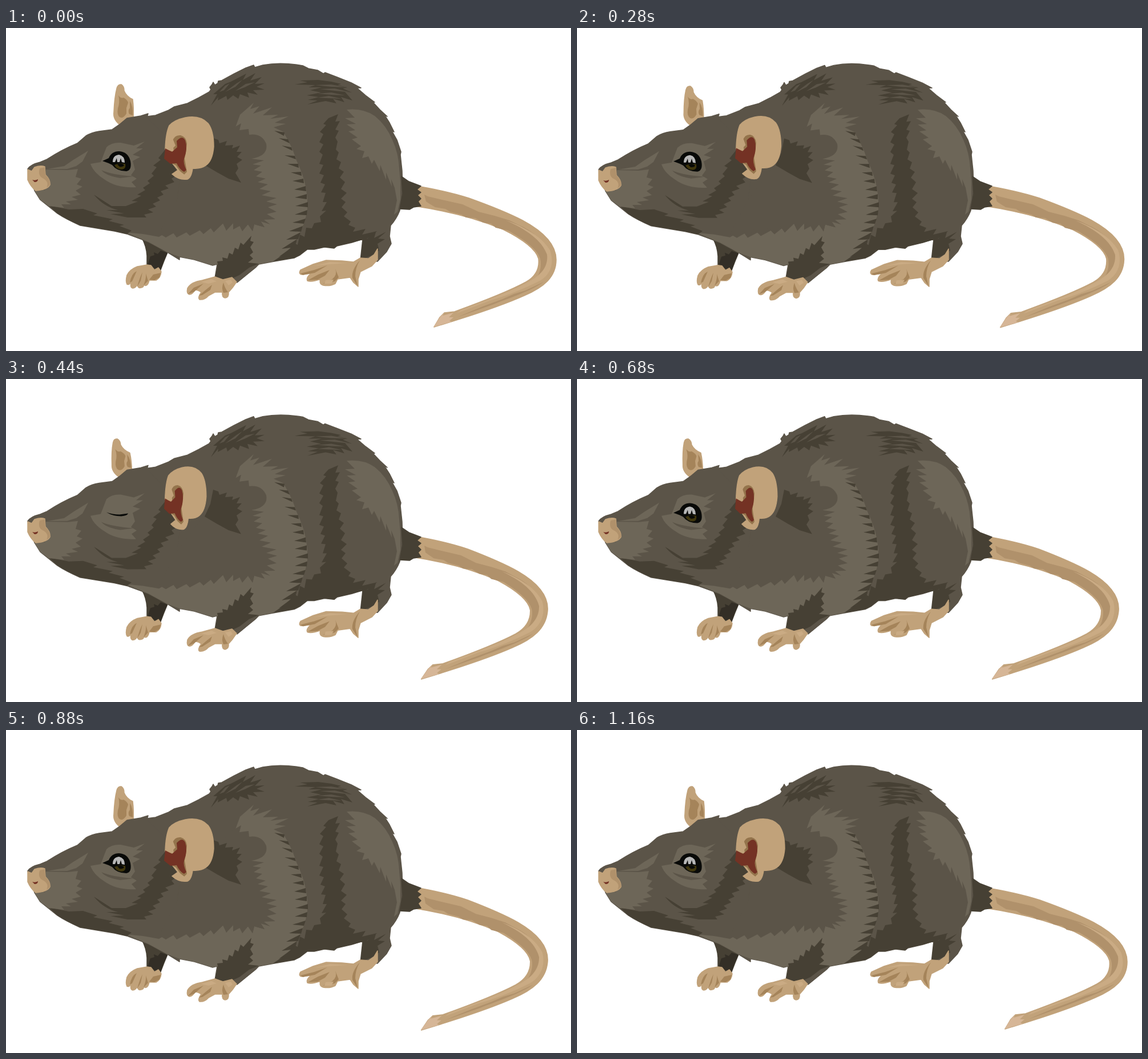
An HTML page that plays this animation: 990 by 566 pixels, repeating every 1.2 s.

```html
<!DOCTYPE html>
<html lang="en">
<head>
<meta charset="utf-8">
<title>Rat</title>
<style>
html, body { margin: 0; width: 100%; height: 100%; overflow: hidden; background: #fff; }
svg { display: block; width: 990px; height: 566px; }
.fur { fill: #5b5448; }
.dark { fill: #464034; }
.deep { fill: #332e26; }
.light { fill: #6d6658; }
.skin { fill: #c1a27a; }
.shade { fill: #a5845a; }
.soft { fill: #b0916b; }
.glow { fill: #caab84; }
.rim { fill: #94744c; }
.red { fill: #743224; }
.ink { fill: #090a08; }
.edge { stroke-width: 1.5; stroke-linejoin: round; }
.fur.edge { stroke: #5b5448; }
.dark.edge { stroke: #464034; }
.skin.edge { stroke: #c1a27a; }
</style>
</head>
<body>
<svg viewBox="0 0 990 566">
  <g id="tail">
    <path class="skin edge" d="M715 276C745 281 786 290 811 298C850 312 880 324 905 337C946 359 964 382 964 406C964 436 943 454 908 469C870 486 800 509 750 524L760 507L768 499L786 497C830 481 880 462 911 445C930 434 935 420 933 404C928 386 903 369 871 353C825 334 770 320 715 312Z"/>
    <path class="soft" d="M733 292L739 295L760 300L800 309L828 322L856 329L882 337L900 346C929 358 947 380 950 402C950 421 942 435 925 444C936 432 939 418 936 404C930 386 906 370 880 355L858 350L850 343L836 341L822 333L806 332L798 327L778 322L770 317L752 314L742 308L736 304Z"/>
    <path class="glow" d="M876 337C910 349 940 367 953 389C961 411 955 431 937 442C908 457 875 470 850 477L790 500L797 494C840 478 886 461 913 446C941 432 950 416 948 397C939 372 912 353 876 337Z"/>
    <path class="soft" d="M942 445C920 461 880 474 852 485L790 507L835 488L870 475L890 466L910 460Z"/>
    <path fill="#d6b697" d="M749 524L760 507L768 499L765 504L784 499L776 507L784 507L777 513L781 515Z"/>
  </g>

  <g id="body">
    <g id="farEar">
      <path class="skin edge" d="M194 106Q196 98 202 99Q207 102 207 110Q211 120 222 125Q224 140 223 160L200 170Q187 160 189 147Q190 122 194 106Z"/>
      <path class="shade" d="M197 118Q201 124 206 122Q213 126 214 131L211 140L211 150Q205 160 199 156Q194 152 196 141Q200 130 197 118ZM217 128Q223 137 222 153L216 151Q213 145 217 140Z"/>
    </g>

    <path class="dark edge" d="M238 368Q246 382 247 399L247 420L270 426L277 408L284 391Z"/>
    <path class="deep" d="M253 400L260 398L259 393L266 396L271 390L283 394L276 409L271 425L253 418L248 415Z"/>
    <path class="skin edge" d="M247 415L230 418Q217 423 212 433Q209 444 212 449Q216 451 219 445Q217 455 222 456Q227 456 230 450Q231 457 237 455Q242 454 241 450Q248 455 251 442L263 442Q271 438 272 427L267 420L260 424L254 416Z"/>
    <path class="shade" d="M229 426Q220 430 217 446L221 444ZM239 428Q234 438 230 453L236 443ZM245 430Q246 439 241 451L249 443ZM251 441L258 432L271 429L269 437L260 442Z"/>

    <!-- torso -->
    <path class="fur edge" d="M247 155L262 153L285 144L295 138L318 132L338 122L356 112L359 108L357 104L361 99L363 95L366 100L371 97L372 93L378 92L400 80L420 70L434 65L436 69L450 65Q482 59 520 66L530 71L546 74L556 80L559 78L580 86L605 96L622 105L615 105L630 118L646 130L643 130L655 143L668 155L663 152L672 166L680 182L676 180L685 196L692 217L691 222L694 250L695 285L690 320Q684 335 674 346L672 365L675 378L667 392L651 409L621 407L625 370L606 376L580 382L575 386L558 384L540 388L528 388L515 398L505 403L470 409L443 414L438 419L405 446L366 438L370 414L362 416L330 406L304 401L304 406L283 393L250 375L215 362Z"/>
    <!-- head -->
    <path class="fur edge" d="M38 247Q43 239 60 235L72 230Q98 213 125 202L140 189Q150 183 163 181L186 178Q200 169 212 158L236 154L249 150L247 157L310 220L290 380L240 368L212 361L190 356L130 346Q105 335 90 325L75 313L60 301L50 285Z"/>

    <!-- flank and belly -->
    <path class="light" d="M402 174L410 152L434 131L428 142L444 137L433 150L466 139L450 153L477 152L463 159L495 155L471 166L490 168L469 174L486 182L496 200L503 215L509 232L516 248L522 265L526 282L528 300L528 320L523 340L510 372L492 392L468 409L443 414L400 418L370 414L362 416L330 406L304 401L283 393L250 375L210 358L240 361L268 366L280 359L280 367L300 356L299 367L324 354L322 364L348 350L346 361L366 345L364 358L386 337L386 355L400 340L398 353L413 345L414 356L424 344L432 356L435 344L453 349L446 338Z"/>
    <path class="fur" d="M393 178L412 167L409 179L425 177L426 187Q448 184 456 203Q460 224 430 229L452 232L432 239L447 241L434 249L449 252L438 260L455 264L441 270L459 274L444 282L464 286L448 293L474 298L456 304L475 309L459 314L474 322L457 326L472 335L452 336L463 344L446 339L453 349L435 344L432 356L424 344L414 356L408 344L398 353L398 339L386 355L379 340L364 358L356 347L346 361L335 350L322 364L310 352L299 367L290 355L280 367L268 360L300 300Z"/>
    <path class="dark" d="M488 183l-18 -3 17 9zM494 195l-16 -2 19 9zM500 209l-17 -3 19 9zM506 224l-18 -1 20 7zM512 238l-19 0 20 7zM517 252l-18 1 19 6zM521 264l-19 4 20 4zM525 277l-20 6 21 3zM527 291l-21 6 21 3zM529 305l-22 7 22 2zM528 319l-22 8 21 1zM525 334l-23 7 20 2zM520 347l-24 9 21 1zM516 358l-25 13 21 -1zM510 370l-27 17 23 -3zM504 382l-26 19 20 -6zM496 393l-25 14 16 -1z"/>

    <!-- vertical stripe and underside -->
    <path class="dark" d="M582 151L577 164L585 163L577 178L583 180L577 192L581 199L578 213L583 218L579 230L587 235L583 246L592 252L585 262L594 270L587 282L597 289L587 299L595 305L588 314L598 323L592 330L604 339L600 345L612 350L608 357L630 352L624 362L650 356L640 366L625 371L606 376L580 382L575 386L558 384L540 388L528 388L515 398L505 403L468 409L494 392L505 377L511 380L515 362L523 366L526 350L536 351L540 342L552 340L550 330L561 320L553 321L562 305L555 305L560 289L552 288L559 274L551 271L557 258L549 255L556 240L549 238L555 222L549 217L556 204L549 200L556 186L550 182L561 170L556 168L565 158Z"/>
    <!-- rump -->
    <path class="light" d="M597 143Q626 140 646 154Q666 170 677 196Q688 220 689 246L691 270L691 300L686 322L680 327L685 302L681 280L675 265L676 278L666 253L666 266L656 240L655 251L645 231L641 238L635 225L624 228L628 216L614 212L622 207L606 195L616 192L600 181L612 179L597 169L613 168L594 158L611 157Z"/>
    <path class="dark" d="M625 370L637 362L632 370L648 358L645 368L666 357L652 369L664 370L651 378L654 390L640 399L621 406Z"/>
    <path class="dark edge" d="M693 260L706 269L727 277L720 283L727 288L721 293L727 299L722 304L727 312L714 314L707 318L690 317L695 290Z"/>

    <!-- back tufts -->
    <path class="dark" d="M359 136L370 116L363 116L384 98L394 94L421 80L415 91L437 79L428 92L448 86L436 98L453 97L439 103L453 108L433 109L441 117L423 113L426 122L410 116L407 124L398 118L388 126L386 119L371 127L372 121Z"/>
    <path class="fur" d="M384 112L404 97L414 91L402 103ZM402 110L420 98L436 95L418 104ZM374 112L384 101L392 97L382 109Z"/>
    <path class="dark" d="M506 99L528 95L515 92L547 91L570 94L587 98L581 100L598 104L590 106L606 113L594 112L607 127L587 121L593 130L573 124L579 132L560 128L528 134L546 127L529 126L548 121L527 118L552 113L533 109L553 104L530 104L542 100Z"/>
    <path class="fur" d="M542 100L570 99L597 104L570 103ZM550 107L576 106L606 113L576 110ZM546 115L570 113L594 118L570 117ZM546 122L566 119L588 124L566 123Z"/>
    <!-- behind the ear -->
    <path class="dark" d="M363 193L372 196L374 202L387 198L384 206L398 205L396 211L410 206L404 217L413 217L405 226L414 231L404 238L407 246L402 254L412 271L390 264L370 253L348 240L358 218Z"/>

    <!-- cheek and jaw -->
    <path class="dark" d="M283 208L267 228L271 231L258 241L264 244L255 255L259 259L248 268L252 272L240 280L244 284L230 292L237 294L220 303L231 304L210 312L185 312L154 292Q171 313 196 319L176 319L207 325L183 326L213 332L246 332L242 327L258 323L249 318L263 313L257 308L270 302L265 297L276 292L271 286L285 281L279 276L295 270L290 264L304 255Z"/>
    <path class="dark" d="M75 311L110 318L135 317L160 325L153 328L187 335L180 338L207 345L199 347L220 355L212 361L190 356L130 346Q105 335 90 325Z"/>
    <path class="light" d="M73 247L102 242L118 231L144 215L134 234L123 242L107 247Z"/>
    <path class="light" d="M126 247L122 261L132 264L124 274L134 278L122 285L131 292L115 296L126 301L105 304L114 309L97 309L102 315L75 312L60 301L50 285L68 284L77 272L69 257L70 248L108 249Z"/>
    <path class="light" d="M148 238L166 235L176 209Q185 200 201 201L224 206L243 199L228 211L240 211L222 222L235 226L222 233L226 248L219 258L229 264L220 270L228 279Q194 281 172 265Q153 253 148 238Z"/>
    <path class="fur" d="M167 249Q184 257 224 260L200 263Q175 259 167 249Z"/>

    <g id="openEye">
      <path class="ink" d="M169 233L180 228Q185 216 198 216Q214 217 218 233Q221 249 211 251Q194 251 186 240L180 237Z"/>
      <path fill="#b8b8b8" d="M187 235Q187 223 198 222Q208 224 208 236L203 235L201 228L199 235L195 235L194 228L191 235Z"/>
      <path fill="#3f360d" d="M190 240L199 237L209 238Q211 247 203 248Q194 248 190 240Z"/>
      <path class="ink" d="M195 239Q201 235 207 240Q205 244 199 243Z"/>
    </g>
    <path id="shutEye" class="ink" d="M176 232Q187 236 199 236L214 234Q213 238 202 239Q187 239 176 232Z"/>

    <!-- nose -->
    <path class="skin edge" d="M38 248L45 251L50 244Q61 240 68 243L69 257Q78 266 77 275Q72 284 52 285Q43 278 38 266Z"/>
    <path class="soft" d="M59 246L68 244L69 257Q78 266 77 275L71 280Q76 270 66 264Q55 260 59 246Z"/>
    <path class="red" d="M46 266Q51 268 56 265Q56 270 50 270Z"/>

    <!-- near front leg -->
    <path class="dark" d="M366 438L371 414L370 409L380 408L379 402L388 404L391 394L397 397L401 385L407 388L411 376L416 380L430 364L428 373L434 375L428 384L433 393L427 398L433 404L424 411L443 413L436 421L405 446Z"/>
    <path class="fur" d="M443 413L426 420L409 433L398 438L405 446L438 420Z"/>
    <path class="skin edge" d="M366 436L344 442Q324 445 318 456Q316 466 321 467Q327 467 331 459Q337 459 342 463Q335 473 339 476Q348 477 355 469L366 463L379 463Q378 472 384 473Q391 472 390 463L397 455L404 445L396 437L380 441Z"/>
    <path class="shade" d="M346 448L329 455L319 466L330 462ZM361 450L351 458L338 469L344 468L358 459ZM381 446Q377 456 381 464L389 463Q383 455 381 446Z"/>
    <path class="glow" d="M342 445L360 440L369 444L355 448ZM384 443L394 441L397 446L390 451Z"/>

    <!-- hind foot -->
    <path class="skin edge" d="M651 387L645 397L635 404L621 403L609 410L589 408L561 407L538 414L516 424Q512 430 517 432L534 430Q525 438 528 443Q535 446 551 440Q548 449 556 451Q568 453 577 448L581 440L603 437L609 446L617 453L617 440L621 427L641 417L651 406Z"/>
    <path class="shade" d="M563 416L540 424L516 430L520 433L541 429ZM567 424L547 432L529 442L546 441L559 434ZM577 422Q581 432 572 440L555 448L576 444L583 437ZM620 407Q605 424 607 438L616 452L612 435Q612 420 620 407Z"/>
    <path class="glow" d="M540 417L568 410L597 412L566 414ZM560 442L574 441L570 448L558 448Z"/>

    <g id="nearEar">
      <path class="skin edge" d="M279 212Q280 184 286 171Q295 161 314 157Q340 152 354 167Q364 180 364 208Q362 233 350 241Q342 247 327 246Q325 262 318 265Q303 267 291 256L301 249L290 235Z"/>
      <path class="rim" d="M292 198Q295 187 306 188Q315 190 317 202Q316 216 313 229L317 252L312 257Q302 253 298 241L285 234L279 213L294 217Z"/>
      <path class="skin" d="M279 212L281 198L293 196L297 206L291 212Z"/>
      <path class="red" d="M299 198Q309 187 314 197Q319 211 312 229Q310 236 316 249L312 252Q304 248 299 237L288 238L277 229L279 211L291 217L300 209Z"/>
      <path class="skin" d="M291 256L301 250L297 240L305 251L314 258L316 265Q301 267 291 256Z"/>
    </g>
  </g>
</svg>
<script>
const LOOP = 1200, STEP = 40;
const el = id => document.getElementById(id);
const clamp = v => Math.max(0, Math.min(1, v));
const span = (t, from, to) => clamp((t - from) / (to - from));
const ease = p => p < .5 ? 2 * p * p : 1 - 2 * (1 - p) ** 2;
const setMatrix = (id, ...m) => el(id).setAttribute('transform', `matrix(${m})`);

function draw(t) {
  const fold = span(t, 160, 400) - span(t, 680, 880);
  const sway = ease(span(t, 160, 440)) - ease(span(t, 880, 1160));
  const shut = t >= 440 && t < 680;

  // The head sinks slightly while the rump stays still.
  setMatrix('body', 1, -.003 * fold, 0, 1, 0, 2.1 * fold);
  setMatrix('farEar', 1, 0, .075 * fold, 1 - .056 * fold, -14.4 * fold, 10 * fold);
  setMatrix('nearEar', 1 - .15 * fold, 0, 0, 1, 41.5 * fold, -3 * fold);

  // The tail leans around its root.
  const a = -.0187 * sway, c = -.0955 * sway, d = .0087 * sway;
  setMatrix('tail', 1 + a, 0, c, 1 + d, -725 * a - 295 * c, -295 * d);

  el('openEye').style.display = shut ? 'none' : '';
  el('shutEye').style.display = shut ? '' : 'none';
}

const start = performance.now();
function tick() {
  const t = (performance.now() - start) % LOOP;
  draw(Math.floor(t / STEP) * STEP);
  requestAnimationFrame(tick);
}
draw(0);
requestAnimationFrame(tick);
</script>
</body>
</html>
```
